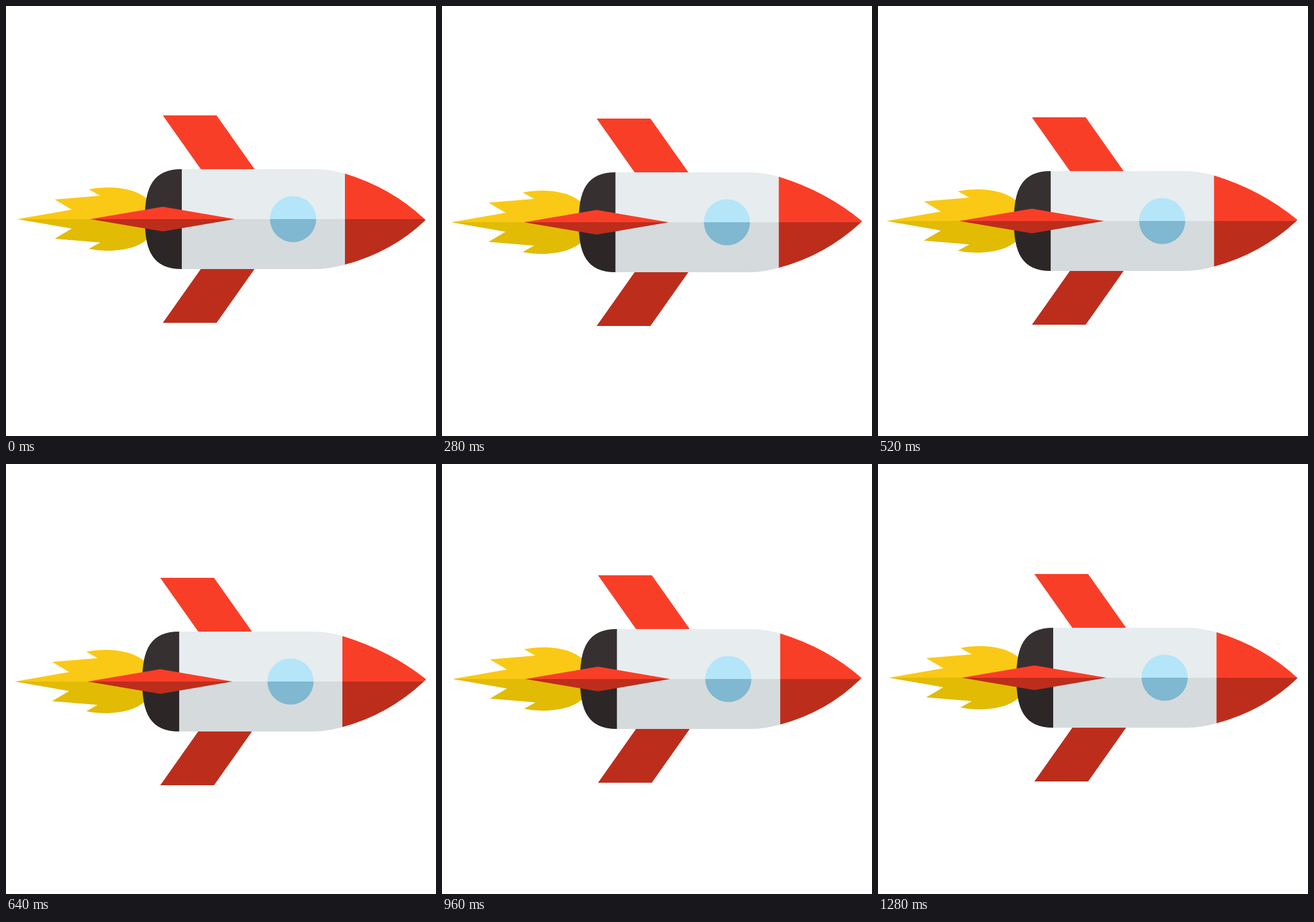
An HTML page with a canvas that plays this animation: 680x680 px, repeating every 1.32 s.

```html
<!DOCTYPE html>
<html lang="en">
<head>
<meta charset="utf-8">
<title>Shaking rocket</title>
<style>
  html, body { margin: 0; width: 100%; height: 100%; overflow: hidden; background: #fff; }
  canvas { display: block; }
</style>
</head>
<body>
<canvas id="stage" width="680" height="680"></canvas>
<script>
const ctx = document.getElementById('stage').getContext('2d');
const STEP = 40, STEPS = 33, AXIS = 337, BOUNCE = 3.2;

// Resting points of the shake
const POSES = [
  { step: 0, x: 0, y: 0 },
  { step: 4, x: -4.6, y: 3 },
  { step: 9, x: -2.8, y: 1 },
  { step: 13, x: -4.6, y: 3 },
  { step: 19, x: -3.5, y: 5 },
  { step: 28, x: 0.4, y: 7 },
  { step: 32, x: -0.7, y: 1 }
];

const LIGHT = { flame: '#f9c915', fin: '#f93e28', tail: '#363130', body: '#e7ecef', glass: '#b4e5f9' };
const SHADE = { flame: '#e2bb04', fin: '#bd2d1c', tail: '#2c2726', body: '#d5dadd', glass: '#7fb8d0' };

// Outlines of one half, with y measured from the rocket's axis
const flame = new Path2D('M18 0 L104 -15 L77 -31 L149 -37 L131 -47 C160 -53 205 -51 225 -30 V0Z');
const fin = new Path2D('M248 -164 H333 L393 -79 H308Z');
const tail = new Path2D('M278 -79 C232 -79 219.5 -50 219.5 0 H278Z');
const body = new Path2D('M278 -79 H490 C506 -79 521 -76 536 -72 V0 H278Z');
const glass = new Path2D('M417.5 0 A36.5 36.5 0 0 1 490.5 0Z');
const sideFin = new Path2D('M133 0 L248 -19.5 L362 0Z');

const mix = (a, b, p) => a + (b - a) * p;

// Eases between poses, bouncing up and down in turn on the way
function shakeAt(step) {
  const i = POSES.findLastIndex(pose => pose.step <= step);
  const from = POSES[i], to = POSES[i + 1] || { ...POSES[0], step: STEPS };
  const p = (step - from.step) / (to.step - from.step);
  const eased = (1 - Math.cos(Math.PI * p)) / 2;
  const bounce = BOUNCE * Math.sin(Math.PI * p) * (i % 2 ? 1 : -1);
  return [mix(from.x, to.x, eased), Math.round(mix(from.y, to.y, eased) + bounce)];
}

function fill(path, color) {
  ctx.fillStyle = color;
  ctx.fill(path);
}

// The nose tip stays almost still while the hull shakes
function nosePath(side, dx, dy) {
  const lag = Math.min(1, Math.max(0, (dy - 3) / 2));
  const tipX = 663.5 + lag - dx;
  const tipY = (338.5 + 2 * lag - AXIS - dy) * side;
  const bulge = 50.5 - 1.5 * side;
  const nose = new Path2D();
  nose.moveTo(536, -72);
  nose.quadraticCurveTo(611, -bulge, tipX, tipY);
  nose.quadraticCurveTo(611, bulge, 536, 72);
  return nose;
}

function drawHalf(side, colors, dx, dy) {
  ctx.save();
  ctx.translate(dx, AXIS + dy);
  ctx.scale(1, side);
  ctx.beginPath();
  ctx.rect(-20, -200, 720, 200);
  ctx.clip();
  fill(flame, colors.flame);
  fill(fin, colors.fin);
  fill(tail, colors.tail);
  fill(body, colors.body);
  fill(glass, colors.glass);
  fill(sideFin, colors.fin);
  fill(nosePath(side, dx, dy), colors.fin);
  ctx.restore();
}

function frame(now) {
  const [dx, dy] = shakeAt(Math.floor(now / STEP) % STEPS);
  ctx.fillStyle = '#fff';
  ctx.fillRect(0, 0, 680, 680);
  drawHalf(1, LIGHT, dx, dy);
  drawHalf(-1, SHADE, dx, dy);
  requestAnimationFrame(frame);
}
frame(0);
</script>
</body>
</html>
```
